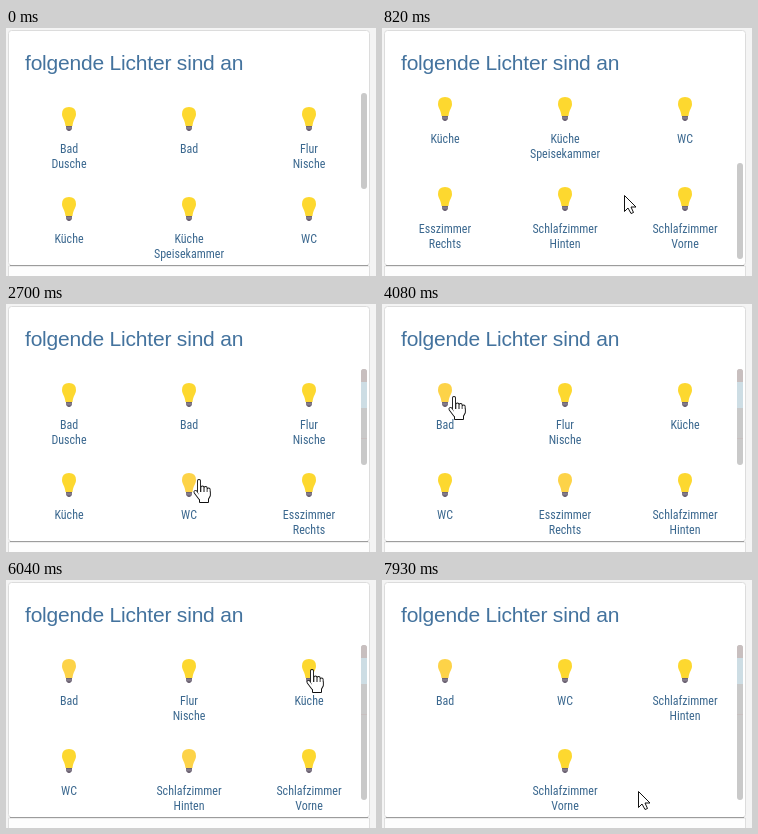
Write an HTML page that moves like this. It is 370 by 248 pixels and loops after 7990 ms.

```html
<!DOCTYPE html>
<html lang="de">
<head>
<meta charset="utf-8">
<title>folgende Lichter sind an</title>
<style>
  html, body { margin: 0; width: 100%; height: 100%; overflow: hidden; background: #f4f4f4; }
  svg { display: block; }
  .title { font: 21px "Liberation Sans", Arial, sans-serif; letter-spacing: -.2px; fill: #44739e; }
  .label {
    font-family: "Roboto Condensed", Roboto, sans-serif; font-size: 12px; font-stretch: 75%;
    text-anchor: middle; fill: #3b688f;
  }
  .glass { fill: #fdd82f; }
  .warm .glass { fill: #fdd348; }
  #hand { stroke-linecap: round; stroke-linejoin: round; }
  .ink { fill: #111; stroke: #111; stroke-width: 2; }
  .ink use { stroke-width: 4; }
  .paper { fill: #fff; }
  .paper use { stroke: #fff; stroke-width: 2.2; }
</style>
</head>
<body>
<svg width="370" height="248" viewBox="0 0 370 248">
  <defs>
    <clipPath id="view"><rect x="3" y="65" width="352" height="171"/></clipPath>
    <clipPath id="track"><rect x="355" y="65" width="6" height="96" rx="3"/></clipPath>
    <g id="bulb">
      <path class="glass" d="M0-12Q7-12 7-5C7-1 4 1 3.5 7H-3.5C-4 1-7-1-7-5Q-7-12 0-12Z"/>
      <path fill="#6f6676" d="M-3 7H3V10L1 12H-1L-3 10Z"/>
      <path stroke="#aaa2ad" stroke-width=".7" d="M-3 9H3"/>
    </g>
    <path id="fingers" d="M0 2V13M3.4 8.5V14M6.6 9V14M9.6 10.5V16M-3.5 13L1 19"/>
    <path id="palm" d="M-1 13H10.6V17L9 20V23H1V20Z"/>
  </defs>

  <path d="M2.5 248V238H363.5V248" fill="#fdfdfd" stroke="#dedede"/>
  <rect x="2.5" y="2.5" width="361" height="235" rx="3" fill="#fff" stroke="#dcdcdc"/>
  <path d="M4 237.5H362" stroke="#9c9c9c"/>
  <text class="title" x="19" y="42">folgende Lichter sind an</text>

  <g clip-path="url(#view)"><g id="list"></g></g>
  <circle id="ripple" fill="#44739e"/>

  <rect id="thumb" x="355" width="6" rx="3" fill="#c9c9c9"/>
  <g id="worn" clip-path="url(#track)">
    <path fill="#c8bfbf" d="M355 65H361V78H355ZM355 134H361V135H355Z"/>
    <path fill="#cddde4" d="M355 78H361V104H355Z"/>
  </g>

  <g id="cursor">
    <path id="arrow" fill="#fff" stroke="#111" d="M.5.5V16.5L4 13 7 18.5 9.5 17.5 7 12H12Z"/>
    <g id="hand">
      <g class="ink"><use href="#fingers"/><path d="M-1 13H10.6V17L9 20V23H1V20Z"/></g>
      <g class="paper"><use href="#fingers"/><use href="#palm" style="stroke: none"/></g>
    </g>
  </g>
</svg>
<script>
const LOOP = 7990, START = performance.now();
const COLUMN = 120, ROW = 90, CENTER = 183, TOP = 91;
const byId = id => document.getElementById(id);

// label and, if it is switched off, when
const lights = [
  ['Bad Dusche', 4080], ['Bad'], ['Flur Nische', 7690], ['Küche', 6600],
  ['Küche Speisekammer', 2530], ['WC'], ['Esszimmer Rechts', 5810],
  ['Schlafzimmer Hinten'], ['Schlafzimmer Vorne']
].map(([name, off = Infinity]) => ({ off, node: makeLight(name) }));

// each tap starts and ends a fixed time before its light goes out
const taps = lights.filter(l => l.off < LOOP).sort((a, b) => a.off - b.off).map(light => {
  const lit = litAt(light.off - 1);
  return { start: light.off - 450, end: light.off - 130, ...slot(lit.indexOf(light), lit.length) };
});
const warmSpots = taps.slice(0, 2);

// pointer rests: time it sets out, time it arrives, place
const rests = [
  [0, 145, 242, 167], [1600, 1980, 193, 175], [2720, 3520, 72, 92], [4400, 4950, 190, 176],
  [5780, 6040, 306, 89], [6600, 6830, 246, 88], [6840, 7400, 189, 90], [7690, 7920, 256, 211]
];

function makeLight(name) {
  const lines = name.split(' ').map((word, i) => `<text class="label" y="${34 + 15 * i}">${word}</text>`);
  const node = document.createElementNS('http://www.w3.org/2000/svg', 'g');
  node.innerHTML = '<use href="#bulb"/>' + lines.join('');
  // the bulb is cloned so that its colour can follow the class of its group
  node.firstChild.replaceWith(byId('bulb').cloneNode(true));
  node.firstChild.removeAttribute('id');
  byId('list').append(node);
  return node;
}

function litAt(t) {
  return lights.filter(l => t < l.off);
}

// three per row, a shorter last row is centred
function slot(i, total) {
  const row = Math.floor(i / 3);
  const inRow = Math.min(3, total - row * 3);
  return { x: CENTER + COLUMN * (i % 3 - (inRow - 1) / 2), y: TOP + ROW * row };
}

const clamp = v => Math.min(1, Math.max(0, v));
const ease = (t, from, to) => {
  const k = clamp((t - from) / (to - from));
  return k * k * (3 - 2 * k);
};
const show = (node, on) => node.style.display = on ? '' : 'none';
const move = (node, x, y) => node.setAttribute('transform', `translate(${x} ${y})`);
const set = (node, values) => Object.entries(values).forEach(([k, v]) => node.setAttribute(k, v));

function pointerAt(t) {
  let [, , x, y] = rests[0];
  for (const [leave, arrive, toX, toY] of rests) {
    const k = ease(t, leave, arrive);
    x += (toX - x) * k;
    y += (toY - y) * k;
  }
  return { x, y };
}

function drawLights(t, scroll, pointer) {
  const lit = litAt(t);
  let over = false;
  lights.forEach(l => show(l.node, t < l.off));
  lit.forEach(({ node }, i) => {
    const { x, y } = slot(i, lit.length);
    const top = y - scroll;
    move(node, x, top);
    node.classList.toggle('warm', warmSpots.some(s =>
      s.x === x && s.y === top && t > s.start && t < s.start + 4600));
    over ||= Math.abs(pointer.x - x) < 22 && pointer.y > top - 18 && pointer.y < top + 45;
  });
  return over;
}

function drawRipple(t) {
  const tap = taps.find(p => t >= p.start && t < p.end);
  show(byId('ripple'), tap);
  if (!tap) return;
  const k = (t - tap.start) / (tap.end - tap.start);
  set(byId('ripple'), { cx: tap.x, cy: tap.y, r: 18 * clamp(.3 + 1.6 * k), opacity: .1 * clamp(2 - 2 * k) });
}

function draw(t) {
  const scroll = 100 * (ease(t, 100, 640) - ease(t, 1220, 1700));
  const pointer = pointerAt(t);
  const over = drawLights(t, scroll, pointer);
  drawRipple(t);

  set(byId('thumb'), { y: 65 + scroll * .7, height: litAt(t).length > 6 ? 96 : 155 });
  show(byId('worn'), t >= taps[0].end);

  show(byId('cursor'), t >= rests[0][1]);
  show(byId('hand'), over);
  show(byId('arrow'), !over);
  move(byId('cursor'), pointer.x, pointer.y);
}

function tick() {
  draw((performance.now() - START) % LOOP);
  requestAnimationFrame(tick);
}
tick();
</script>
</body>
</html>
```
